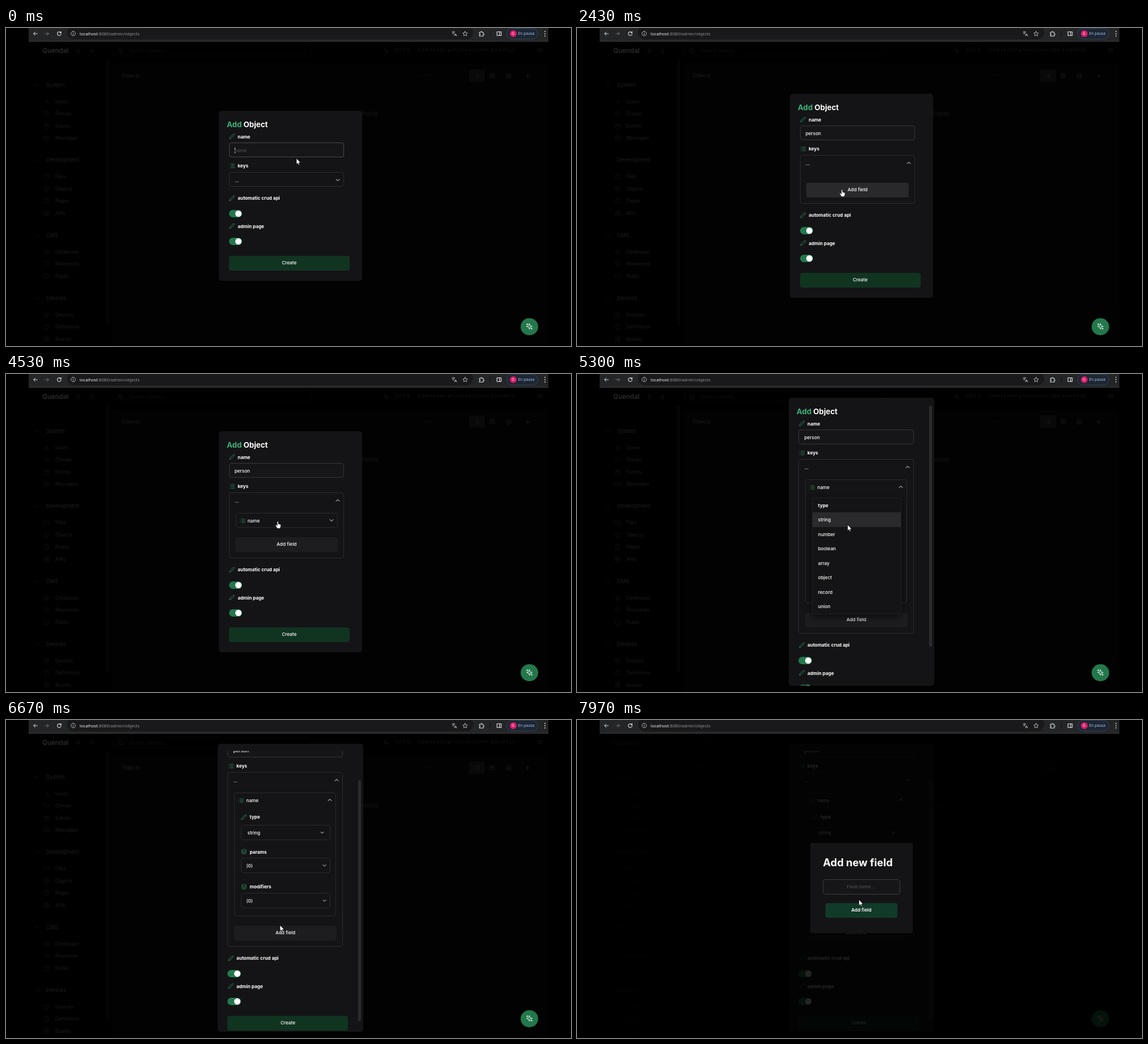
Animation of 998 by 561 pixels, one loop 8 s. Source, as an HTML page:

```html
<!DOCTYPE html>
<html lang="en">
<head>
<meta charset="utf-8">
<title>Add object</title>
<style>
html, body { margin: 0; width: 100%; height: 100%; overflow: hidden; background: #000; }
#stage { position: absolute; left: 0; top: 0; width: 998px; height: 561px; overflow: hidden; background: #000; font: 400 8.2px Inter, sans-serif; color: #fff; }
#stage div, #stage svg { position: absolute; box-sizing: border-box; }
.t { white-space: nowrap; line-height: 20px; }
.b { font-weight: 700; }
.m { font-weight: 500; }
.c { text-align: center; }
svg { overflow: visible; fill: none; stroke-linecap: round; stroke-linejoin: round; }
.box { border: 1px solid #2b2b2e; border-radius: 4px; }
.btn { border-radius: 4px; text-align: center; font-weight: 500; line-height: 25.5px; }
.sw { width: 23.5px; height: 12.5px; border-radius: 7px; background: #23784b; }
.sw::after { content: ""; position: absolute; right: 1px; top: .7px; width: 11px; height: 11px; border-radius: 50%; background: #fff; }
.caret { display: inline-block; width: .9px; height: 10px; margin-right: -.9px; background: #ddd; vertical-align: -2px; }
.group { left: 0; width: 100%; }
#modal { background: #141416; border-radius: 5px; overflow: hidden; }
#clip { inset: 0; clip-path: inset(12.5px 0 0 0); }
#keys, #item { overflow: hidden; }
#veil { left: 0; top: 24px; width: 998px; height: 537px; background: #000; }
#dialog { left: 412px; top: 217px; width: 180.5px; height: 158.5px; background: #141416; border-radius: 4px; }
#bar { left: 40px; top: 0; width: 918px; height: 24px; background: #242527; border-bottom: 1px solid #3d3e40; }
#bar, #bar div { font-family: "Open Sans", sans-serif; }
</style>
</head>
<body>
<div id="stage"></div>
<script>
const GREEN = '#2f9c68';
const P = {
  pencil: 'M17 3a2.8 2.8 0 1 1 4 4L7.5 20.5 2 22l1.5-5.5Z',
  list: 'M8 5h14M8 12h14M8 19h14M2.5 5h.1M2.5 12h.1M2.5 19h.1',
  layers: 'M12 2 2 7l10 5 10-5ZM2 17l10 5 10-5M2 12l10 5 10-5',
  down: 'm5 9 7 7 7-7',
  up: 'm5 15.5 7-7 7 7',
  sparkles: 'M12 3l1.9 5.8a2 2 0 0 0 1.3 1.3L21 12l-5.8 1.9a2 2 0 0 0-1.3 1.3L12 21l-1.9-5.8a2 2 0 0 0-1.3-1.3L3 12l5.8-1.9a2 2 0 0 0 1.3-1.3ZM5 3v4M3 5h4M19 17v4M17 19h4',
  back: 'M20 12H4m7-7-7 7 7 7',
  next: 'M4 12h16m-7-7 7 7-7 7',
  reload: 'M20 12a8 8 0 1 1-2.4-5.7L20 8.5M20 3v5.5h-5.5',
  info: 'M12 2a10 10 0 1 0 .1 0M12 11v6M12 7v.1',
  lang: 'm5 8 6 6M4 14l6-6 2-3M2 5h12M7 2h1M22 22l-5-10-5 10M14 18h6',
  star: 'm12 2 3 6.6 7 .8-5.2 4.8 1.4 7L12 17.7l-6.2 3.5 1.4-7L2 9.4l7-.8Z',
  puzzle: 'M3 6h6V5a2.5 2.5 0 0 1 5 0v1h5v6h1a2.5 2.5 0 0 1 0 5h-1v5H3v-5h1a2.5 2.5 0 0 0 0-5H3Z',
  side: 'M3 4h18v16H3ZM14 4h7v16h-7Z',
  user: 'M4 21v-2a5 5 0 0 1 5-5h6a5 5 0 0 1 5 5v2M12 3a4 4 0 1 0 .1 0',
  tag: 'M3 3h9l9 9-9 9-9-9ZM8 8h.1',
  cal: 'M3 5h18v16H3ZM3 10h18M8 2v5M16 2v5',
  mail: 'M2 5h20v14H2Zl10 8 10-8',
  folder: 'M3 4h6l3 3h9v13H3Z',
  cube: 'm12 2 9 5v10l-9 5-9-5V7Zm0 10v10M3 7l9 5 9-5',
  page: 'M5 2h9l5 5v15H5ZM14 2v5h5',
  moon: 'M12 3a6 6 0 0 0 9 9 9 9 0 1 1-9-9Z',
  search: 'M11 3a8 8 0 1 0 .1 0M17 17l5 5',
  pulse: 'M2 12h4l3-9 6 18 3-9h4',
  plus: 'M12 4v16M4 12h16',
  grid: 'M3 3h18v18H3ZM3 12h18M12 3v18'
};

const css = o => Object.entries(o).map(([k, v]) => k + ':' + (typeof v === 'number' ? v + 'px' : v)).join(';');
const div = (x, y, w, h, cls = '', style = '', inner = '', id = '') =>
  `<div${id && ` id="${id}"`} class="${cls}" style="${css({ left: x, top: y, width: w, height: h })};${style}">${inner}</div>`;
// text placed by its left edge and vertical centre
const txt = (x, y, s, cls = '', style = '', id = '') =>
  `<div${id && ` id="${id}"`} class="t ${cls}" style="left:${x}px;top:${y - 10}px;${style}">${s}</div>`;
const icon = (x, y, s, name, color = '#fff', sw = 2, cls = '') =>
  `<svg class="${cls}" viewBox="0 0 24 24" width="${s}" height="${s}" style="left:${x - s / 2}px;top:${y - s / 2}px" stroke="${color}" stroke-width="${sw}"><path d="${P[name]}"/></svg>`;
const label = (x, y, name, s) => icon(x, y, 10.5, name, GREEN, 1.8) + txt(x + 10, y, s, 'b');

function pageHtml() {
  const dim = 'color:#171717', ic = '#101613';
  const menu = [
    [100.5, 'System', [['Users', 'user'], ['Groups', 'tag'], ['Events', 'cal'], ['Messages', 'mail']]],
    [233, 'Development', [['Files', 'folder'], ['Objects', 'cube'], ['Pages', 'page'], ['APIs', 'grid']]],
    [365.5, 'CMS', [['Databases', 'layers'], ['Resources', 'tag'], ['Public', 'folder']]],
    [476.5, 'Devices', [['Devices', 'cube'], ['Definitions', 'page'], ['Boards', 'grid']]]
  ];
  let s = div(177, 56, 5, 470, '', 'background:#050506') +
    div(188, 63, 769, 520, '', 'background:#020202;border-radius:5px') +
    txt(64, 40, 'Quendal', '', 'color:#2a2a2a;font-size:11.5px;font-weight:600') +
    icon(128, 40, 8, 'moon', '#191919') + icon(151, 40, 8, 'star', '#191919') +
    div(190, 30, 350, 20, '', 'border:1px solid #060606;border-radius:5px') +
    icon(202, 40, 11, 'search', '#191919') + txt(217, 40, 'Search objects...', '', 'color:#0e0e0e;font-size:8.6px') +
    icon(671, 40, 10, 'pulse', '#191919') +
    txt(687, 39, 'DOCS', '', 'color:#171717;font-size:7px;letter-spacing:1.8px') +
    txt(728, 39, 'SOMEBODY@PLACEHOLDER.EXAMPLE', '', 'color:#171717;font-size:6.5px;letter-spacing:1.8px') +
    icon(943, 39, 8, 'mail', '#191919') +
    txt(204, 84, 'Objects', '', 'color:#1b1b18;font-size:9px') +
    txt(728, 84, '0 items', '', 'color:#0b0b0b;font-size:7px') +
    div(818, 73, 28, 22, '', 'background:#080908;border-radius:3px') +
    icon(832, 84, 10, 'list', '#191c1a') + icon(859, 84, 10, 'grid', '#191919') +
    icon(887, 84, 11, 'layers', '#191919') + icon(921, 84, 11, 'plus', '#1a1a1a') +
    div(458, 140, 200, 20, 't', 'text-align:right;color:#161616;font-size:10px', 'There are no objects to display');
  for (const [y, name, items] of menu) {
    s += icon(55, y, 8, 'down', '#202020') + txt(71, y, name, '', 'color:#1e1e1e;font-size:9.3px');
    items.forEach(([n, p], i) => {
      const yy = y + 29 + i * 21.5;
      s += icon(72, yy, 10, p, ic, 1.8) + txt(87, yy, n, 'm', dim + ';font-size:8.3px');
    });
  }
  return s;
}

function modalHtml() {
  const select = (y, s, x = 9, cx = 146) =>
    div(11, y, 158, 26.5, 'box', '', txt(x - 1, 12.5, s, 'm') + icon(cx, 12.5, 9, 'down', '#fff', 2.4));
  const item = icon(11, 12.5, 10, 'list', GREEN, 1.8) + txt(20, 12.5, 'name', 'm') +
    icon(168, 12, 10, 'up', '#fff', 2.4, 'up') + icon(168, 12, 10, 'down', '#fff', 2.4, 'down') +
    label(16, 42, 'pencil', 'type') + select(56, 'string', 11, 142) +
    label(16, 103.5, 'layers', 'params') + select(114, '(0)') +
    label(16, 165, 'layers', 'modifiers') + select(176, '(0)');
  const keys = txt(9, 13.5, '...', 'm') +
    icon(191.5, 12.5, 10, 'up', '#fff', 2.4, 'up') + icon(191.5, 12.5, 10, 'down', '#fff', 2.4, 'down') +
    div(11, 35, 180, 26, 'box', '', item, 'item') +
    div(10.5, 48, 181, 25.5, 'btn', '', 'Add field', 'addBtn');
  const rows = ['type', 'string', 'number', 'boolean', 'array', 'object', 'record', 'union'].map((s, i) =>
    div(0, i * 25.5, 156, 25.5, '', i === 1 ? 'background:#2a2a2d' : '', txt(10, 13, s, i ? 'm' : 'b'))).join('');
  const top = txt(14, 24, '<span style="color:#3cb179">Add</span> Object', 'b', 'font-size:13.3px') +
    label(23.3, 45.5, 'pencil', 'name') +
    div(17.7, 56, 203.5, 26, 'box', 'background:#161618', txt(9, 12.5, '', 'm', '', 'nameText'), 'nameBox') +
    label(23.3, 97.3, 'list', 'keys');
  const bottom = label(23.3, 20, 'pencil', 'automatic crud api') +
    div(17.7, 41, 23.5, 12.5, 'sw') +
    label(23.3, 69.5, 'pencil', 'admin page') +
    div(17.7, 90.3, 23.5, 12.5, 'sw') +
    div(17.7, 122, 213, 25.5, 'btn', 'background:#113421', 'Create');
  return `<div id="modal"><div id="clip"><div id="scroll" class="group">${top}` +
    div(17.7, 108, 203.5, 26, 'box', '', keys, 'keys') +
    `<div id="bottom" class="group">${bottom}</div>` +
    div(41, 175.5, 158, 206, '', 'background:#141416;border:1px solid #202023;border-radius:4px;box-shadow:0 6px 12px #0008', rows, 'menu') +
    '</div></div>' + div(248, 14, 5, 425, '', 'background:#2c2c2f;border-radius:3px', '', 'thumb') + '</div>';
}

const dialogHtml = '<div id="veil"></div><div id="dialog">' +
  txt(22.5, 34, 'Add new field', 'b', 'font-size:18.4px') +
  div(21.5, 63.5, 137.5, 27.5, 'box', 'border:1.5px solid #3e3e41;background:#161618;border-radius:5px',
    div(0, 2, 134, 20, 't c m', '', '', 'fieldText')) +
  div(26.5, 106, 127.5, 25.5, 'btn', 'background:#113a29;font-weight:600', 'Add field') + '</div>';

const barHtml = '<div id="bar">' +
  div(68, -5, 717, 25, '', 'background:#19191b;border-radius:12px') +
  icon(12, 10, 10, 'back', '#ddd', 2.4) + icon(32, 10, 10, 'next', '#777', 2.4) + icon(53.5, 10, 10, 'reload', '#ddd', 2.6) +
  icon(78.5, 10, 9.5, 'info', '#ddd') +
  txt(90, 10, 'localhost<span style="color:#9a9a9c">:8080/admin/objects</span>', '', 'font-size:7.7px') +
  icon(751.5, 10, 10, 'lang', '#ccc') + icon(771, 9.5, 10, 'star', '#ccc') +
  icon(800, 9.5, 10, 'puzzle', '#ddd', 2.6) + div(814.5, 5, 1.5, 9, '', 'background:#0c0c0d') +
  icon(831, 10, 10, 'side', '#eee', 2.6) +
  div(843.5, 0, 56, 19.5, '', 'background:#1d2733;border:1px solid #334457;border-radius:10px') +
  div(849.5, 4, 12, 12, 'c', 'background:#d91a66;border-radius:50%;font-size:6.5px;line-height:12px', 'G') +
  txt(864.5, 10, 'En pausa', '', 'font-size:6.8px;color:#a8c7fa') +
  [6, 10, 14].map(y => div(911, y - 1, 2, 2, '', 'background:#ddd;border-radius:50%')).join('') + '</div>';

const fab = div(909, 511.5, 30.5, 30.5, '', 'background:#23784b;border-radius:50%', icon(15.2, 15.2, 13, 'sparkles', '#fff', 1.8));

const shapes = {
  arrow: '<path d="M0 0V10.6L2.4 8.3 4 11.9 5.7 11.1 4.1 7.7H7.3Z" fill="#fff" stroke="#000" stroke-width=".7"/>',
  hand: '<path d="M-1.1 1a1.1 1.1 0 0 1 2.2 0V4.6l3.2.7q1.3.3 1.2 1.6L5 10q-.3 2.4-2.2 2.4H.4q-1.1 0-1.8-1L-3.9 7.6q-.5-1 .4-1.4.8-.3 1.5.5l.9 1Z" fill="#fff" stroke="#000" stroke-width=".6"/>',
  beam: '<path d="M-2-4.8Q0-4.8 0-3.8 0-4.8 2-4.8M0-4V4M-2 4.8Q0 4.8 0 3.8 0 4.8 2 4.8" stroke="#ddd" stroke-width=".9"/>'
};

const stage = document.getElementById('stage');
stage.innerHTML = pageHtml() + modalHtml() + fab + dialogHtml + barHtml + '<svg id="cursor" width="1" height="1"></svg>';
const ui = {};
stage.querySelectorAll('[id]').forEach(e => ui[e.id] = e);

// start, end, x, y
const moves = [
  [0, 0, 513, 229.5], [1250, 1600, 502.8, 261.3], [1980, 2360, 468, 285], [2660, 3000, 484.3, 296],
  [3980, 4180, 500, 334], [4350, 4560, 479, 256], [5010, 5200, 478, 266], [5700, 6200, 484, 362],
  [6750, 7000, 491, 373], [7350, 7750, 497.5, 316.5]
];
const kinds = [
  [0, 'arrow'], [1500, 'hand'], [2640, 'arrow'], [2920, 'beam'], [4130, 'hand'], [4340, 'arrow'],
  [4480, 'hand'], [4990, 'arrow'], [6850, 'hand'], [7240, 'arrow']
];
const nameKeys = [110, 200, 450, 600, 760, 920];
const fieldKeys = [3300, 3450, 3600, 3750];
const OPEN_KEYS = 1850, DIALOG1 = 2560, ADDED = 4290, OPEN_ITEM = 4650, MENU_ON = 4950, MENU_OFF = 5560, DIALOG2 = 7200;

const ramp = (t, a, d) => Math.min(1, Math.max(0, (t - a) / d));
const ease = p => p * p * (3 - 2 * p);
const show = (e, on) => e.style.display = on ? '' : 'none';
const flip = (box, open) => {
  show(box.querySelector(':scope > .up'), open);
  show(box.querySelector(':scope > .down'), !open);
};

function typed(box, t, word, times, start, hint, focus) {
  const n = times.filter(k => t >= k).length;
  const since = t - (n ? times[n - 1] : start);
  const caret = focus && since % 1060 < 530 ? '<i class="caret"></i>' : '';
  const html = n ? word.slice(0, n) + caret : caret + `<span style="color:#4b4b4d">${hint}</span>`;
  if (box.last !== html) box.innerHTML = box.last = html;
}

function draw(t) {
  const open = ease(ramp(t, OPEN_KEYS, 160));
  const grow = ease(ramp(t, OPEN_ITEM, 160));
  const added = t >= ADDED;
  const itemH = 26 + 192 * grow;
  const keysH = 26 + 60 * open + (added ? 4 + itemH : 0);
  const full = 108 + keysH + 165.5;
  const wide = full > 507.5;
  const h = Math.min(full, 507.5);
  const scroll = 58 * ease(ramp(t, 6290, 310));

  ui.modal.style.cssText = css({ left: wide ? 373.8 : 376, top: 295.8 - h / 2, width: wide ? 257 : 253, height: h });
  ui.scroll.style.top = -scroll + 'px';
  show(ui.thumb, wide);
  ui.thumb.style.top = 14 + scroll * 50 / 58 + 'px';

  ui.nameBox.style.borderColor = t < OPEN_KEYS ? '#49494b' : '#37373a';
  typed(ui.nameText, t, 'person', nameKeys, 0, 'name', t < OPEN_KEYS);

  ui.keys.style.height = keysH + 'px';
  ui.keys.style.background = t >= 1500 && t < OPEN_KEYS ? '#222226' : 'none';
  flip(ui.keys, open > 0);
  show(ui.item, added);
  ui.item.style.height = itemH + 'px';
  flip(ui.item, grow > 0);
  show(ui.addBtn, open > 0);
  ui.addBtn.style.top = Math.max(48, keysH - 38) + 'px';
  const hover = t > 2250 && t < DIALOG1 || t > 6850 && t < DIALOG2;
  ui.addBtn.style.background = hover ? '#29292c' : '#1d1d20';
  ui.bottom.style.top = 108 + keysH + 'px';
  show(ui.menu, t >= MENU_ON && t < MENU_OFF);

  const shade = t < 5000 ? ramp(t, DIALOG1, 120) - ramp(t, ADDED, 100) : ramp(t, DIALOG2, 120);
  ui.veil.style.opacity = shade * .86;
  ui.dialog.style.opacity = shade;
  if (t < 5000) typed(ui.fieldText, t, 'name', fieldKeys, DIALOG1, 'Field name...', true);
  else typed(ui.fieldText, t, '', [], DIALOG2, 'Field name...', true);

  let [, , x, y] = moves[0];
  for (const [a, b, nx, ny] of moves.slice(1)) {
    const p = ease(ramp(t, a, b - a));
    x += (nx - x) * p;
    y += (ny - y) * p;
  }
  ui.cursor.style.left = x + 'px';
  ui.cursor.style.top = y + 'px';
  const kind = kinds.filter(k => t >= k[0]).pop()[1];
  if (ui.cursor.kind !== kind) ui.cursor.innerHTML = shapes[ui.cursor.kind = kind];
}

const begin = performance.now();
function tick() {
  draw((performance.now() - begin) % 8000);
  requestAnimationFrame(tick);
}
tick();
</script>
</body>
</html>
```
